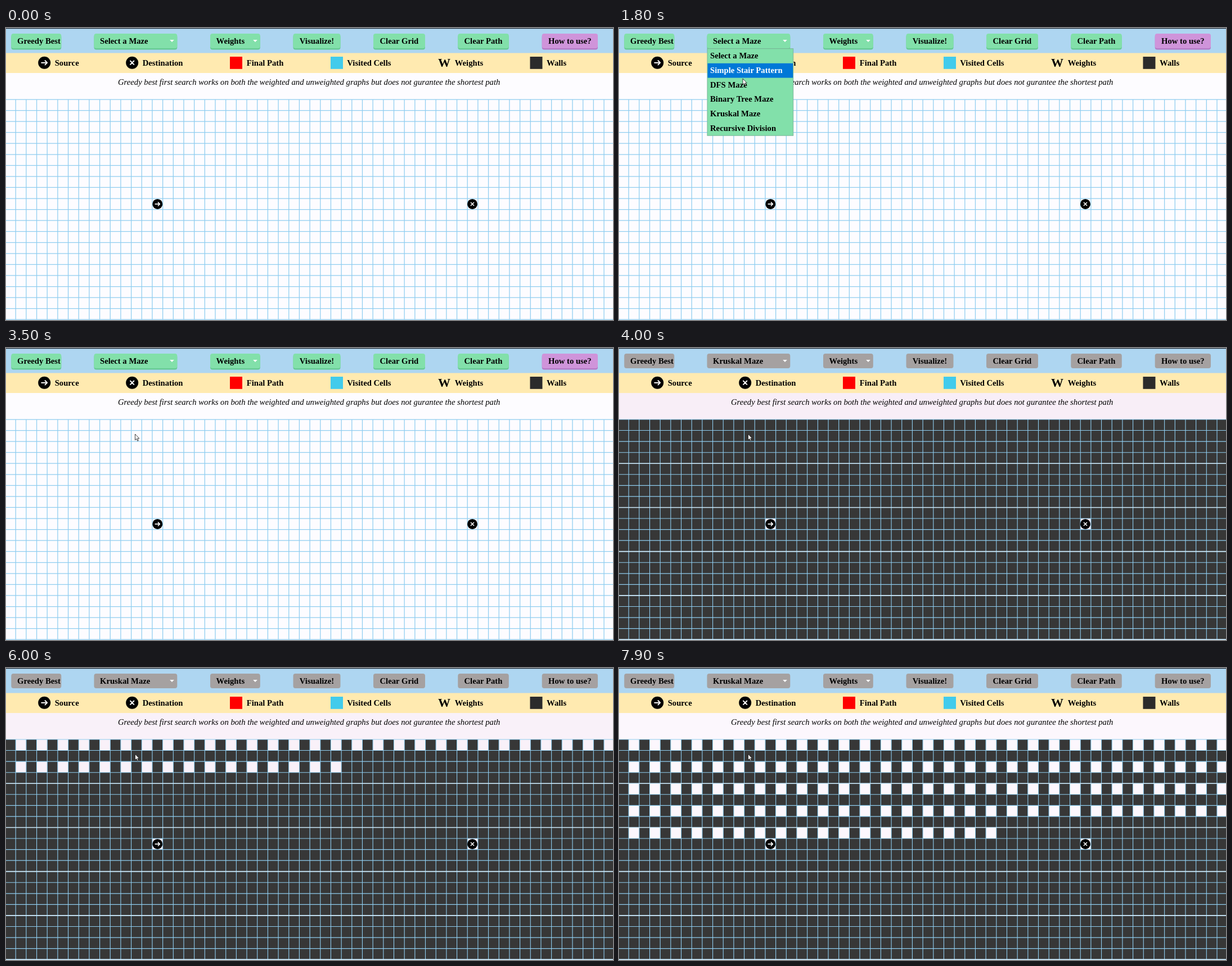
Recreate the animation shown at these times as an HTML page. Size 1079 by 519 pixels, loop 8000 ms.

```html
<!DOCTYPE html>
<html lang="en">
<head>
<meta charset="utf-8">
<title>Maze visualizer</title>
<style>
  html, body { margin: 0; width: 100%; height: 100%; overflow: hidden; background: #fdfcff; }
  svg { display: block; width: 100%; height: 100%; }
  text { font: bold 14.7px "Liberation Serif", "Times New Roman", serif; fill: #000; white-space: pre; }
  .note { font-weight: normal; font-style: italic; }
  .big { font-size: 22px; }
  .button { fill: #82e0aa; }
  .lip { fill: #67cb93; }
  .help .button { fill: #cf94da; }
  .help .lip { fill: #b57ac6; }
  .busy .button { fill: #a5a1a1; }
  .busy .lip { display: none; }
  .grid { stroke: #8fcdf0; stroke-width: 1.25; fill: none; }
  .busy .grid { stroke-width: 1.1; }
  .seams { stroke: #cdeafb; stroke-width: 1.7; fill: none; }
  .seams, .walls { display: none; }
  .busy .seams, .busy .walls { display: inline; }
  .walls { fill: #373737; }
  .mark { fill: none; stroke: #fff; stroke-width: 1.9; stroke-linecap: round; stroke-linejoin: round; }
  .pointer { fill: #fff; stroke: #111; stroke-width: .8; stroke-linejoin: round; }
  .on { fill: #fff; }
</style>
</head>
<body>
<svg id="stage" viewBox="0 0 1079 519" preserveAspectRatio="none"></svg>
<script>
const LOOP = 8000, STEP = 100;
const X0 = 17.2, Y0 = 127, W = 18.675, H = 19.56, ROWS = 20, COLS = 57;
const MENU_Y = 37, ITEM_H = 25.75;
const stage = document.getElementById('stage');

function add(tag, attrs, parent = stage) {
  const el = document.createElementNS('http://www.w3.org/2000/svg', tag);
  for (const key in attrs) el.setAttribute(key, attrs[key]);
  parent.appendChild(el);
  return el;
}
const rect = (x, y, width, height, attrs, parent) => add('rect', { x, y, width, height, ...attrs }, parent);
const path = (d, cls, parent) => add('path', { d, class: cls }, parent);
function label(x, y, str, cls = '', parent = stage) {
  const el = add('text', { x, y, class: cls }, parent);
  el.textContent = str;
  return el;
}
const show = (el, on) => el.setAttribute('visibility', on ? 'visible' : 'hidden');

function badge(x, y, r, isSource) {
  const g = add('g', { transform: `translate(${x} ${y}) scale(${r / 11})` });
  add('circle', { r: 11 }, g);
  path(isSource ? 'M-5 0H5M1.3 -3.7L5 0L1.3 3.7' : 'M-3.2 -3.2L3.2 3.2M3.2 -3.2L-3.2 3.2', 'mark', g);
}

// Page bands
const page = rect(0, 0, 1079, 519);
rect(0, 0, 1079, 45, { fill: '#aed6f1' });
rect(0, 0, 1079, 1.2, { fill: '#20242a' });
rect(0, 44.5, 1079, 35.5, { fill: '#ffeab0' });

// Toolbar
function button(x, width, textX, str, arrowX, cls = '') {
  const g = add('g', { class: cls });
  rect(x, 12, width, 26.5, { rx: 4, class: 'lip' }, g);
  rect(x, 10, width, 26, { rx: 4, class: 'button' }, g);
  if (arrowX) add('path', { d: `M${arrowX - 3.8} 21H${arrowX + 3.8}L${arrowX} 25Z`, fill: '#fff' }, g);
  return label(textX, 27.8, str, '', g);
}
button(9.3, 89, 20, 'Greedy Best');
const mazeName = button(156.5, 147.8, 167, 'Select a Maze', 295);
button(363, 88.8, 373.5, 'Weights', 443);
button(510.5, 84, 521.8, 'Visualize!');
button(653, 92, 664.5, 'Clear Grid');
button(803.3, 90.5, 814.5, 'Clear Path');
button(952.7, 99.3, 964, 'How to use?', 0, 'help');

// Legend
const legend = (x, str) => label(x, 66.8, str);
const swatch = (x, fill) => rect(x, 51, 22, 21.8, { fill });
badge(68.2, 61.7, 11, true);
badge(224.2, 61.7, 11, false);
swatch(398, '#f00');
swatch(577, '#41cbec');
swatch(931.5, '#2b2b2b');
label(768, 69, 'W', 'big');
legend(86.7, 'Source');
legend(242.7, 'Destination');
legend(427.7, 'Final Path');
legend(606.3, 'Visited Cells');
legend(797.7, 'Weights');
legend(961, 'Walls');
label(199, 101, 'Greedy best first search works on both the weighted and unweighted graphs but does not gurantee the shortest path', 'note');

// Maze
const cell = (col, row, attrs) => rect(X0 + col * W, Y0 + row * H, W, H, attrs);
rect(0, Y0, 1079, ROWS * H, { class: 'walls' });
const openCells = [];
for (let row = 0; row < 10; row += 2)
  for (let col = 0; col < COLS; col += 2) openCells.push(cell(col, row));
const ends = [cell(13, 9), cell(43, 9)];
let lines = '', seams = '';
for (let c = 0; c < COLS; c++) lines += `M${X0 + c * W} ${Y0}V${Y0 + ROWS * H}`;
for (let r = 0; r <= ROWS; r++) {
  const line = `M0 ${Y0 + r * H}H1079`;
  lines += line;
  if (r && r % 4 === 0) seams += line;
}
path(lines, 'grid');
path(seams, 'seams');
badge(269.3, 312.9, 9, true);
badge(829, 312.9, 9, false);

// Drop-down list
const menu = add('g', {});
rect(157, 36.7, 152.7, 154.5, { fill: '#82e0aa', stroke: '#79b596', 'stroke-width': 1 }, menu);
const bar = rect(157.5, 0, 151.7, ITEM_H, { fill: '#0078d7' }, menu);
const items = ['Select a Maze', 'Simple Stair Pattern', 'DFS Maze', 'Binary Tree Maze', 'Kruskal Maze', 'Recursive Division']
  .map((str, i) => label(162, MENU_Y + ITEM_H * i + 17.2, str, '', menu));

// Mouse pointer
const mouse = add('g', {});
const arrow = path('M0 0V10.6L2.5 8.4L4.2 12.2L5.9 11.5L4.2 7.8H7.4Z', 'pointer', mouse);
const hand = path('M-1 .8Q0 -.4 1 .8V5.5L6.5 6.6Q7.8 7 7.6 8.8L6.8 14H.4L-2.8 9.2Q-3 7.6 -1 8.6Z', 'pointer', mouse);

// Each point is [time, ...values]; values are joined linearly.
const route = [[400, 205, 7], [900, 214, 17], [1300, 214, 17], [1800, 220, 90], [2100, 227, 146], [2200, 229.5, 153]];
const opened = [[5300, 0], [5400, 1], [6200, 60], [6700, 87], [6800, 92], [6900, 92], [7800, 129], [7900, 134]];
const tint = [[5400, 248, 238, 247], [6700, 250, 244, 251], [7900, 252, 247, 253]];

function at(points, t) {
  const i = points.findIndex(p => p[0] > t);
  if (i === 0) return points[0].slice(1);
  if (i < 0) return points[points.length - 1].slice(1);
  const a = points[i - 1], b = points[i], k = (t - a[0]) / (b[0] - a[0]);
  return a.slice(1).map((v, j) => v + (b[j + 1] - v) * k);
}

function draw(t) {
  const busy = t >= 4000, menuOpen = t >= 800 && t < 2800;
  stage.setAttribute('class', busy ? 'busy' : '');
  mazeName.textContent = busy ? 'Kruskal Maze' : 'Select a Maze';

  const paper = busy ? `rgb(${at(tint, t).map(Math.round)})` : '#fdfcff';
  [page, ...ends, ...openCells].forEach(el => el.setAttribute('fill', paper));
  const count = Math.round(at(opened, t)[0]);
  openCells.forEach((el, i) => show(el, i < count));

  // The highlight trails the pointer by one step.
  const hover = Math.max(0, Math.floor((at(route, t - STEP)[1] - MENU_Y) / ITEM_H));
  show(menu, menuOpen);
  bar.setAttribute('y', MENU_Y + hover * ITEM_H);
  items.forEach((el, i) => el.setAttribute('class', i === hover ? 'on' : ''));

  const [x, y] = at(route, t);
  const isHand = t < 1400 || (t >= 2800 && t < 3500);
  mouse.setAttribute('transform', `translate(${x} ${y})`);
  show(hand, t >= 400 && isHand);
  show(arrow, t >= 400 && !isHand);
}

let last = -1;
function tick() {
  const t = Math.floor(performance.now() % LOOP / STEP) * STEP;
  if (t !== last) draw(last = t);
  requestAnimationFrame(tick);
}
tick();
</script>
</body>
</html>
```
